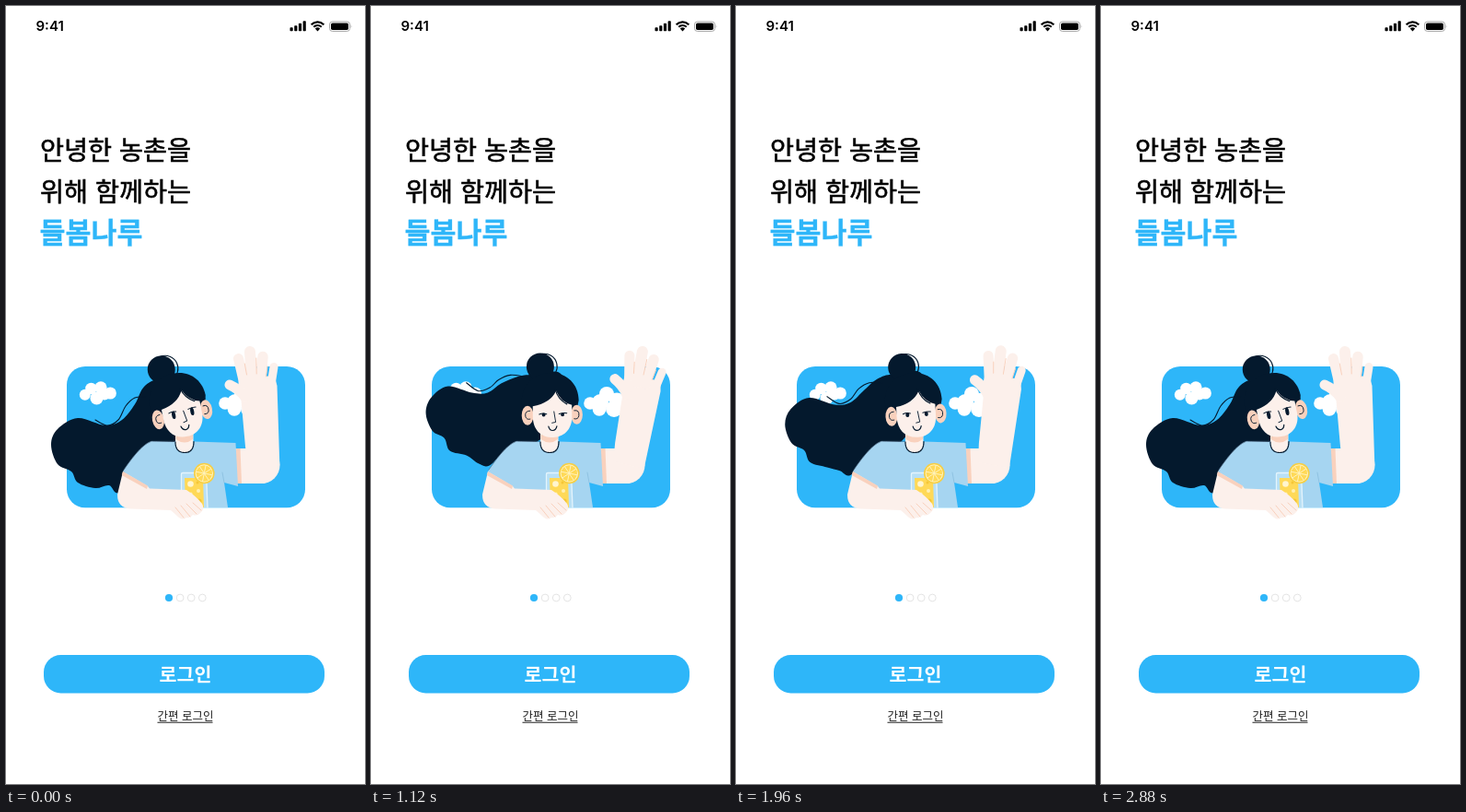
These frames come from a looping animation (390x844 px, 2920 ms). An HTML page with a canvas:

```html
<!DOCTYPE html>
<html lang="ko">
<head>
<meta charset="utf-8">
<title>로그인</title>
<style>
  html, body { margin: 0; width: 100%; height: 100%; overflow: hidden; background: #fff; }
  canvas, svg { position: absolute; left: 0; top: 0; width: 390px; height: 844px; }
  text { font-family: "Noto Sans CJK KR", "Noto Sans CJK", "Noto Sans", sans-serif; }
  .clock { font: 600 15px Inter, sans-serif; }
  .title { font-size: 28.3px; stroke: #000; stroke-width: 0.6px; }
  .brand { font-size: 30.4px; font-weight: 700; fill: #2eb6f9; stroke: #2eb6f9; stroke-width: 0.3px; }
  .login { font-size: 20.6px; font-weight: 700; fill: #fff; text-anchor: middle; }
  .easy { font-size: 12.5px; fill: #222; text-anchor: middle; }
</style>
</head>
<body>
<canvas id="stage"></canvas>
<svg viewBox="0 0 390 844">
  <text class="clock" x="32.5" y="27">9:41</text>
  <text class="title" x="37" y="167">안녕한 농촌을</text>
  <text class="title" x="37" y="212">위해 함께하는</text>
  <text class="brand" x="36.5" y="257.3">들봄나루</text>
  <text class="login" x="195" y="733.3">로그인</text>
  <text class="easy" x="195" y="775">간편 로그인</text>
</svg>
<script>
const LOOP = 2920, STEP = 40;
const BLUE = '#2eb6f9', DARK = '#04192d', SKIN = '#fcf0eb', PEACH = '#f9d1bd',
      SHIRT = '#a6d5f1', YELLOW = '#ffd957', WHITE = '#fff';

const canvas = document.getElementById('stage');
const c = canvas.getContext('2d');
const dpr = window.devicePixelRatio || 1;
canvas.width = 390 * dpr;
canvas.height = 844 * dpr;

function fill(d, color) {
  c.fillStyle = color;
  c.fill(new Path2D(d));
}
function line(d, color, width = 1) {
  c.strokeStyle = color;
  c.lineWidth = width;
  c.stroke(new Path2D(d));
}
function oval(x, y, rx, color, ry = rx) {
  c.beginPath();
  c.ellipse(x, y, rx, ry, 0, 0, 7);
  c.fillStyle = color;
  c.fill();
}
function box(x, y, w, h, r, color) {
  c.beginPath();
  c.roundRect(x, y, w, h, r);
  c.fillStyle = color;
  c.fill();
}
function ring(x, y, r, color, width, from = 0, to = 7) {
  c.beginPath();
  c.arc(x, y, r, from, to);
  c.strokeStyle = color;
  c.lineWidth = width;
  c.stroke();
}

// Smooth curve through points
function curve(pts, closed) {
  const n = pts.length;
  const at = i => closed ? pts[(i + n) % n] : pts[Math.max(0, Math.min(n - 1, i))];
  c.beginPath();
  c.moveTo(...pts[0]);
  for (let i = 0; i < (closed ? n : n - 1); i++) {
    const a = at(i - 1), b = at(i), d = at(i + 1), e = at(i + 2);
    c.bezierCurveTo(b[0] + (d[0] - a[0]) / 6, b[1] + (d[1] - a[1]) / 6,
                    d[0] - (e[0] - b[0]) / 6, d[1] - (e[1] - b[1]) / 6, d[0], d[1]);
  }
}

const ease = x => (1 - Math.cos(Math.PI * Math.max(0, Math.min(1, x)))) / 2;
// Rises until up, rests, then returns between from and to
const sway = (t, up, from, to) => t < from ? ease(t / up) : 1 - ease((t - from) / (to - from));

// Each row: left pose x, y, right pose x, y
const HAIR = [
  [200, 405, 208, 402], [168, 404, 176, 400], [150, 413, 160, 402], [140, 432, 142, 409],
  [126, 449, 127, 419], [108, 455, 110, 419], [78, 447, 84, 412], [56, 459, 66, 424],
  [49, 476, 60, 441], [56, 497, 67, 460], [71, 505, 80, 468], [78, 517, 86, 482],
  [97, 523, 104, 487], [112, 520, 117, 496], [123, 528, 129, 498], [150, 505, 148, 482],
  [185, 470, 190, 465]
];
const STRAND = [
  [97, 449, 104, 408], [110, 455, 117, 417], [122, 449, 130, 413],
  [130, 434, 139, 405], [140, 425, 152, 400], [152, 424, 168, 402]
];
// Points travel on a bow rather than a straight line
function blend(rows, p) {
  const bow = p * (1 - p);
  return rows.map(([x, y, u, v]) => [x + (u - x) * p - 8 * bow, y + (v - y) * p - 9 * bow]);
}

const CLOUDS = [
  [85.8, 421.7, 6], [92.5, 415, 6.3], [103, 413.8, 6.6], [113.3, 420, 6.6], [98.5, 425.5, 7], [107, 421.5, 6],
  [238, 431, 6.8], [248, 437.5, 7.3], [256, 421, 8], [264, 437, 9], [267, 428, 8.5], [249, 430, 9]
];

function statusBar() {
  for (let i = 0; i < 4; i++) {
    const h = [4, 6, 8.5, 11][i];
    box(308.5 + i * 4.7, 27.2 - h, 3.2, h, 0.8, '#000');
  }
  const lo = -Math.PI * 0.76, hi = -Math.PI * 0.24;
  c.lineCap = 'butt';
  ring(338.5, 26.8, 9.4, '#000', 2.2, lo, hi);
  ring(338.5, 26.8, 5.8, '#000', 2.1, lo, hi);
  fill('M338.5 27.5L335.8 24.5Q338.5 22.2 341.2 24.5Z', '#000');
  c.beginPath();
  c.roundRect(351.5, 17, 22, 10.4, 3);
  c.strokeStyle = '#a6a6a6';
  c.lineWidth = 1;
  c.stroke();
  box(353, 18.5, 19, 7.4, 1.7, '#000');
  fill('M374.7 20.3Q376.3 22.2 374.7 24Z', '#a6a6a6');
}

function controls() {
  oval(177, 642, 4.1, BLUE);
  for (let i = 1; i < 4; i++) ring(177 + i * 12.1, 642, 3.9, '#dedede', 0.8);
  box(41, 704, 305, 41.4, 18.5, BLUE);
  box(164.5, 776.8, 60, 1, 0, '#222');
}

function backHair(p) {
  curve(blend(HAIR, p), true);
  c.fillStyle = DARK;
  c.fill();
  curve(blend(STRAND, p), false);
  c.strokeStyle = DARK;
  c.lineWidth = 1.1;
  c.stroke();
}

function wavingArm(p) {
  box(249, 480, 32, 38, 0, SKIN);
  oval(277.7, 498.2, 19.8, SKIN);
  c.save();
  c.translate(280, 497);
  c.rotate(p * 14.5 * Math.PI / 180);
  c.translate(-280, -497);
  fill('M253 400L292 402L294.500 412L297.300 498L263 498L260 478L255.500 428L252 421Z', SKIN);
  line('M243 411Q252 415 260 424', SKIN, 11);
  line('M252.5 382.5L258.5 408', SKIN, 11);
  line('M265 375L267 408', SKIN, 12);
  line('M279 380.5L276.5 408', SKIN, 11.4);
  line('M291 391.5L287.5 414', SKIN, 9);
  line('M259.3 388L261.5 400M271.8 382L272.2 399M284 391L282.5 402', PEACH, 1);
  c.restore();
  fill('M250 480H254.5L256 518H250Z', PEACH);
}

function body() {
  fill('M184 458H203.500V476Q202 485 194 485Q186 485 184 476Z', SKIN);
  fill('M184.500 464H203V470Q194 477 184.500 470Z', PEACH);
  fill('M158 472L184 473C184 480 187 485 194 485C201 485 204 480 204 472.500L249.500 474' +
       'L252 521L237 517L241 544H150L153 523L127 505C135 493 147 476 158 472Z', SHIRT);
  c.setLineDash([1.8, 0.8]);
  line('M184 473C184 480 187 484.500 194 484.500C201 484.500 204 480 204 472.500', DARK, 1.2);
  line('M128 503C136 492 147 476 158 472.300H184', '#536f88', 0.7);
  c.setLineDash([]);
  line('M237 517L235 506', '#8fc3e2', 1);
}

function drink() {
  fill('M190 508Q190 506 192 506H216Q218 506 218 508L219 544H191Z', '#b9e0f5');
  line('M190.500 544V508Q190.500 506.500 192 506.500H216Q217.500 506.500 217.500 508L219 544', '#e4f4fc', 1.3);
  fill('M194 512H214L215 544H195Z', YELLOW);
  oval(200.5, 518.5, 3.3, '#fff5cf');
  oval(209, 526, 2, '#fff0b3');
  oval(201, 529, 1.6, '#fff0b3');
  oval(210, 537, 2.6, '#f5c637');
  oval(208, 517, 1.5, '#f5c637');
  oval(215.3, 507, 11.3, '#f7cf43');
  oval(215.3, 507, 9.7, '#fff3bd');
  oval(215.3, 507, 8.7, YELLOW);
  for (let i = 0; i < 4; i++) {
    const a = i * Math.PI / 4 + 0.2, x = Math.cos(a) * 8.7, y = Math.sin(a) * 8.7;
    line(`M${215.3 - x} ${507 - y}L${215.3 + x} ${507 + y}`, '#fff3bd', 1);
  }
}

function restingArm() {
  fill('M127 505L154 521L156 523.500L196 525Q207 532 213 540Q216 545 212 549' +
       'Q208 554 203 552Q200 556 196 555Q192 558 188 555L179 547L136 545.500Q121 545 121 530Z', SKIN);
  fill('M127 505L154 520.500L153 524L125.800 509Z', PEACH);
  line('M196 540L207 551M190 542L200 554M184 544L193 555M203 539L212 547', PEACH, 1);
}

function head(p) {
  c.save();
  c.translate(191.5 + 5.5 * p, 443.5 + 0.5 * p);
  c.rotate((p - 1) * 11.5 * Math.PI / 180);
  c.translate(-197, -444);

  oval(184.5, 391.3, 15, DARK);
  ring(189, 391, 13.8, DARK, 1.1, -1.8, 1.2);
  fill('M164 430C164 410 178 398 196 398C214 398 226 411 226 428L223 442L208 452H178L166 446Z', DARK);

  oval(170.3, 444, 6.4, PEACH, 10.5);
  oval(223.7, 443.5, 6.4, PEACH, 10.5);
  line('M173 439Q167 439 168 445Q169 449 173 448M221 439Q227 438 226 445Q225 449 221 448', DARK, 0.9);

  fill('M176 434Q195 431 201.500 417.500Q207 430 218.500 433V446C218.500 460 209 468 198 468' +
       'C184 468 176 459 176 445Z', SKIN);
  line('M200.500 416Q203.500 427 213 432', DARK, 1.2);

  const ry = 4.3 - 2.5 * p, eye = 442.5 + p, lid = eye - ry + 0.3;
  oval(187.8, eye, 2, DARK, ry);
  oval(208.3, eye, 2, DARK, ry);
  line(`M183 ${lid + 1}Q187 ${lid - 0.8} 191 ${lid + 0.8}M204.500 ${lid + 0.8}Q209 ${lid - 0.8} 213 ${lid}`, DARK, 1);
  line('M199 440L200.800 451.500L196.800 452.300', DARK, 0.9);
  line('M193 456Q194 460.500 197.500 460.500Q201 460.500 202 456', DARK, 1.2);
  c.restore();
}

function draw(t) {
  const pose = sway(t, 1280, 1610, 2620);
  const drift = sway(t, 1240, 1450, 2560);
  c.setTransform(dpr, 0, 0, dpr, 0, 0);
  c.fillStyle = WHITE;
  c.fillRect(0, 0, 390, 844);
  statusBar();
  controls();
  c.lineCap = 'round';
  c.lineJoin = 'round';
  box(66, 391, 259, 153.3, 20, BLUE);
  for (const [x, y, r] of CLOUDS) oval(x, y, r, WHITE);
  backHair(drift);
  wavingArm(pose);
  body();
  drink();
  restingArm();
  head(pose);
}

const start = performance.now();
function tick(now) {
  const t = Math.max(0, now - start) % LOOP;
  draw(Math.floor(t / STEP) * STEP);
  requestAnimationFrame(tick);
}
draw(0);
requestAnimationFrame(tick);
</script>
</body>
</html>
```
